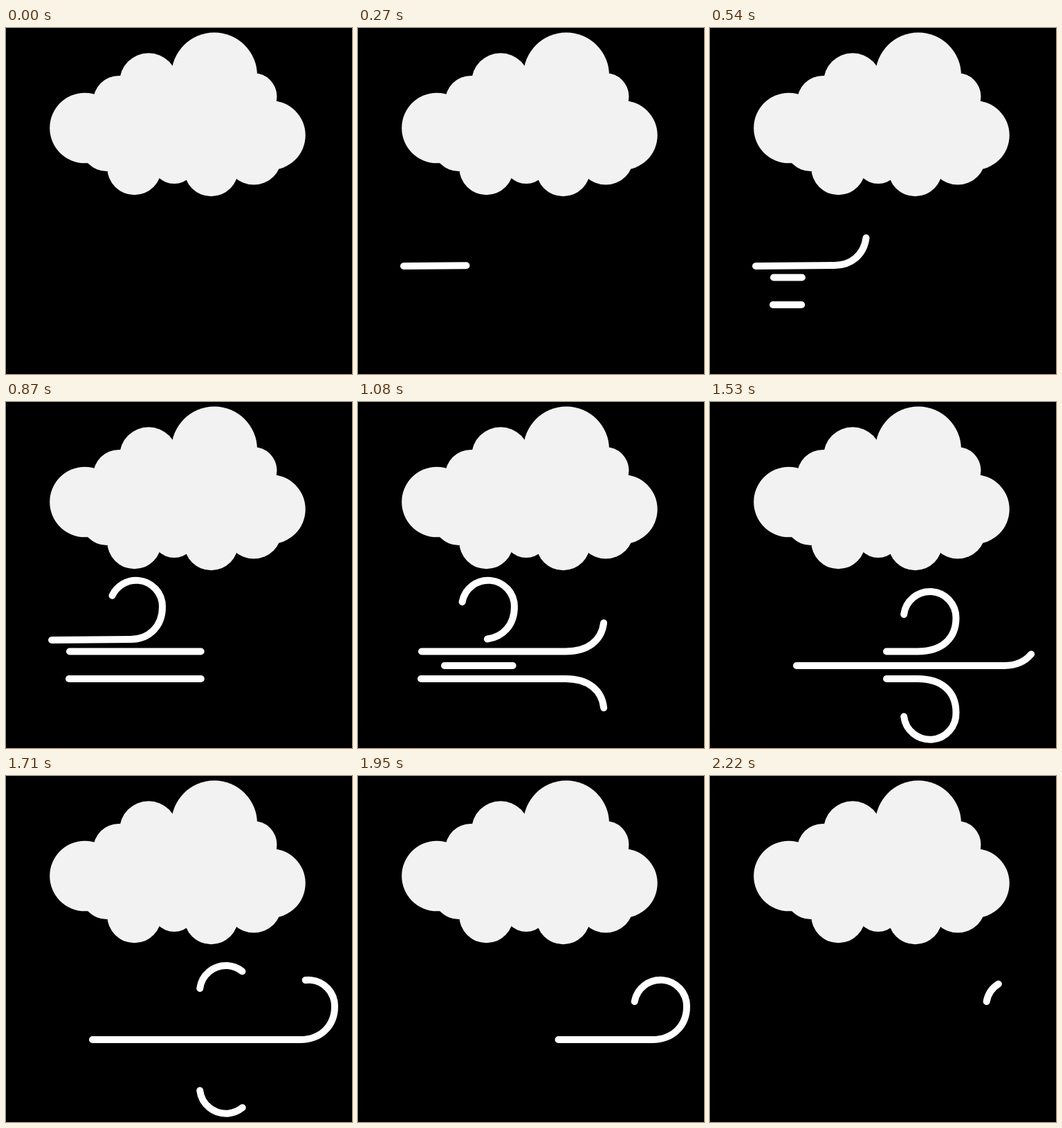
An HTML page for the animation above (2250 ms loop, 500 by 500 pixels).

```html
<!DOCTYPE html>
<html lang="en">
<head>
<meta charset="utf-8">
<title>Windy</title>
<style>
  html, body { margin: 0; width: 100%; height: 100%; overflow: hidden; background: #000; }
  svg { display: block; width: 100%; height: 100%; }
  .cloud { fill: #f2f2f2; }
  .wind path {
    fill: none;
    stroke: #fff;
    stroke-width: 10;
    stroke-linecap: round;
    stroke-dasharray: 100 300;
    animation: gust 2250ms linear infinite;
  }
  /* Negative delays start the later gusts 450 ms and 900 ms into the loop. */
  .wind .second { animation-delay: -1800ms; }
  .wind .third { animation-delay: -1350ms; }

  /* Draw from the tail, then erase twice as fast; hide the bare round cap at both ends. */
  @keyframes gust {
    0% { stroke-dashoffset: 100; visibility: hidden; }
    0.8% { visibility: hidden; }
    40% { stroke-dashoffset: 0; visibility: visible; }
    60%, 100% { stroke-dashoffset: -100; visibility: hidden; }
  }
</style>
</head>
<body>
<svg viewBox="0 0 500 500">
  <g class="cloud">
    <path d="M114 144L163 106 206 78 301 68 383 155 358 186 297 204 186 202 146 170Z"/>
    <circle cx="114" cy="144.5" r="50.8"/>
    <circle cx="163" cy="106" r="37"/>
    <circle cx="206" cy="78.2" r="42"/>
    <circle cx="301" cy="68.5" r="62"/>
    <circle cx="357.5" cy="99" r="34"/>
    <circle cx="382.7" cy="155" r="50"/>
    <circle cx="358" cy="186" r="40.5"/>
    <circle cx="296.5" cy="204" r="39.2"/>
    <circle cx="243" cy="192" r="33"/>
    <circle cx="185.5" cy="202" r="39.2"/>
    <circle cx="145.5" cy="170" r="37"/>
  </g>
  <g class="wind">
    <path pathLength="100" d="M66 344L180 343C206 343 226 325 226 296A38 38 0 0 0 150.6 289"/>
    <path class="second" pathLength="100" d="M92 360.5H300C335 360.5 355.5 342 355.5 312A37.8 37.8 0 0 0 280.2 307"/>
    <path class="second" pathLength="100" d="M91 400H300C335 400 355.5 418.5 355.5 448.5A37.8 37.8 0 0 1 280.2 454.5"/>
    <path class="third" pathLength="100" d="M125 381H425C455 381 475 361 475 333A38 38 0 0 0 399.6 326"/>
  </g>
</svg>
</body>
</html>
```
